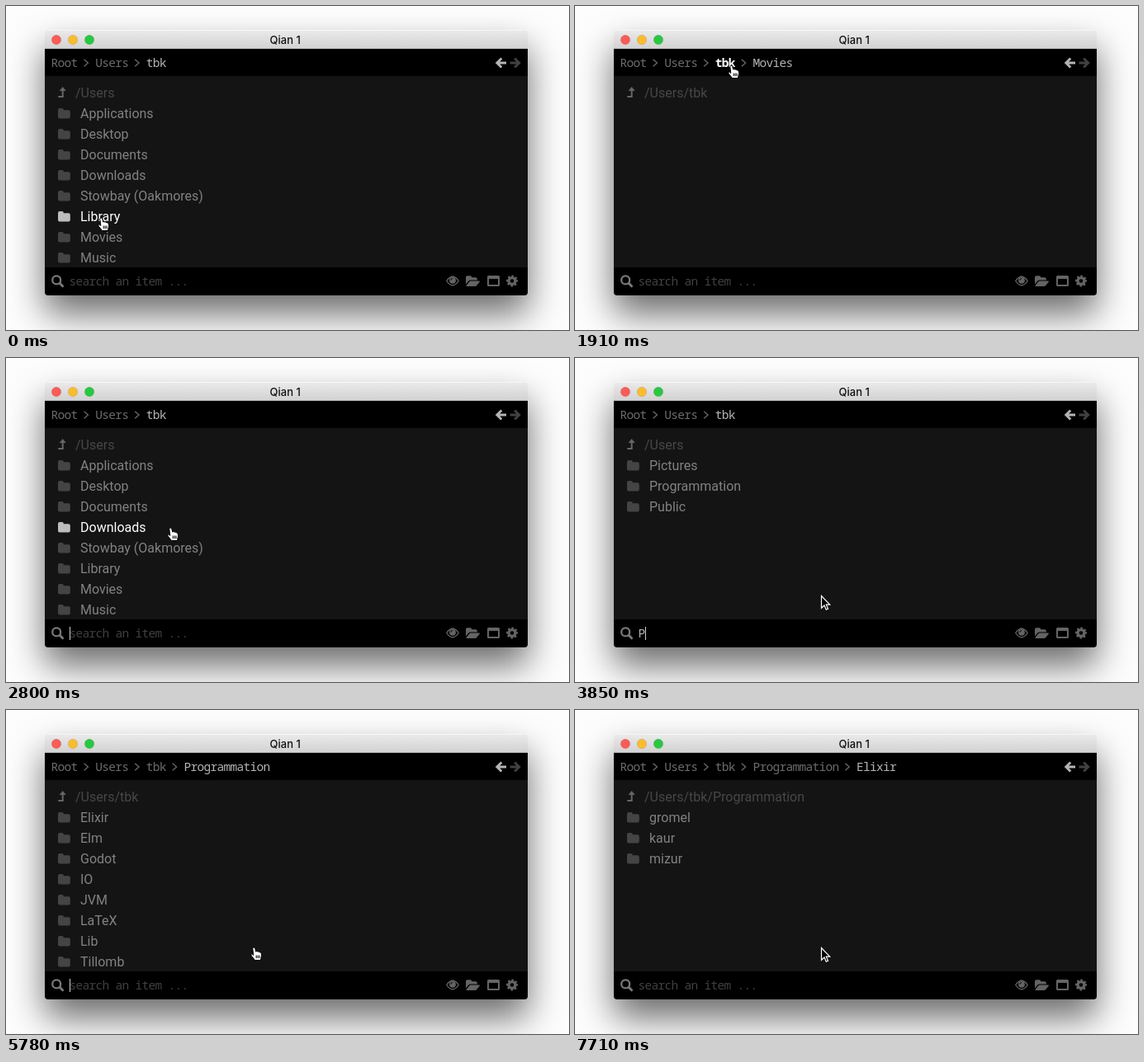
Recreate the animation shown at these times as an HTML page. Size 682 by 393 pixels, loop 8 s.

```html
<!DOCTYPE html>
<html lang="en">
<head>
<meta charset="utf-8">
<title>File browser</title>
<style>
  html, body { margin: 0; width: 100%; height: 100%; overflow: hidden; background: #fdfdfd; }
  svg { display: block; width: 682px; height: 393px; }
  text { white-space: pre; }
  .title { font: 500 13px Inter, sans-serif; fill: #111; text-anchor: middle; }
  .mono { font: 14.5px "Noto Sans Mono", monospace; letter-spacing: -.7px; }
  .item { font: 16px Roboto, sans-serif; }
  .line { fill: none; }
</style>
</head>
<body>
<svg viewBox="0 0 682 393">
  <defs>
    <linearGradient id="bar" x2="0" y2="1">
      <stop stop-color="#ebebeb"/>
      <stop offset="1" stop-color="#d1d1d1"/>
    </linearGradient>
    <path id="folder" d="M2 0h2.8a2 2 0 0 1 2 2v.3h6a2 2 0 0 1 2 2v6.2a2 2 0 0 1-2 2H2a2 2 0 0 1-2-2V2a2 2 0 0 1 2-2z"/>
    <g id="up">
      <path class="line" stroke="currentColor" stroke-width="2" d="M63.3 110h5.4v-8"/>
      <path fill="currentColor" d="M64.6 103l4.1-5 4.1 5z"/>
    </g>
    <path id="arrow" d="M.5 .5V15.300l3.500-3.300 2.300 5.200 2.200-.9-2.200-5.100h4.400z" fill="#000" stroke="#fff" stroke-width="1.200"/>
    <g id="hand" stroke="#000">
      <path fill="#fff" d="M.8 1.500Q1 0 2.400 .1 3.600 .2 3.900 1.700L4.700 5.100Q5.500 4 6.800 5.100 8 4.400 9 5.700 10.700 5.400 11.200 7.100 12 9.500 11.200 12L10.400 15.500H3.600L-.6 10.300Q-1.800 8.500-.6 8.100 .4 7.900 1.800 9.500z"/>
      <path class="line" d="M5.200 9.500v3.600M7.100 9.500v3.600M9 9.500v3.600"/>
    </g>
  </defs>

  <rect width="682" height="393" fill="#fdfdfd"/>
  <rect x="47" y="51" width="585" height="322" rx="5" fill-opacity=".58" style="filter: blur(21.5px)"/>
  <rect x="47" y="40" width="585" height="311" rx="4" fill="#000"/>
  <path d="M47 52V34a5 5 0 0 1 5-5h575a5 5 0 0 1 5 5v18z" fill="url(#bar)"/>
  <path d="M51 29.5h577" stroke="#f6f6f6"/>
  <path d="M47 51.5h585" stroke="#bababa"/>
  <rect x="47" y="85" width="585" height="232" fill="#141414"/>
  <g stroke="#000" stroke-opacity=".1">
    <circle cx="61" cy="41" r="5.700" fill="#fc5b57"/>
    <circle cx="81" cy="41" r="5.700" fill="#fdbc2e"/>
    <circle cx="101" cy="41" r="5.700" fill="#28c840"/>
  </g>
  <text class="title" x="338.2" y="46">Qian 1</text>

  <g class="line" stroke-width="2.800">
    <path stroke="#b4b4b4" d="M600.3 63.4L594.7 69l5.6 5.6M595 69h11"/>
    <path stroke="#414141" d="M616.2 63.4l5.6 5.6-5.6 5.6M621.5 69h-11"/>
  </g>

  <g class="line" stroke="#777">
    <circle cx="61.2" cy="332.4" r="5" stroke-width="2.3"/>
    <path d="M65.2 336.4l3.4 3.4" stroke-width="3" stroke-linecap="round"/>
  </g>
  <g fill="#646464" stroke="#646464" stroke-width="0">
    <path class="line" stroke-width="1.3" d="M533.7 333.5q7.300-10.500 14.600 0-7.300 10.500-14.600 0z"/>
    <circle cx="541" cy="332.8" r="3.9"/>
    <path class="line" stroke="#000" stroke-width="1" d="M538.9 332.7q.2-2 2.1-2.1"/>
    <path d="M557 337.5v-8.200a2 2 0 0 1 2-2h3.200a2 2 0 0 1 2 2h4.600a2 2 0 0 1 2 2v1.200h-8.100q-1.600 0-2.600 1.200z"/>
    <path d="M557.6 339l3.400-4.300q.9-1.100 2.200-1.100h10q1.300 0 .5 1.100l-3.300 4.100q-1 1.200-2.200 1.200h-10q-1.200 0-.6-1z"/>
    <path fill-rule="evenodd" d="M584.5 327h12a1.5 1.5 0 0 1 1.5 1.5v10a1.5 1.5 0 0 1-1.5 1.5h-12a1.5 1.5 0 0 1-1.5-1.5v-10a1.5 1.5 0 0 1 1.5-1.5zM585 331v7h11v-7z"/>
    <g class="line" transform="translate(613 333.5)">
      <circle r="3.9" stroke-width="3.2"/>
      <circle r="5.9" stroke-width="2.2" stroke-dasharray="2.4 2.234" transform="rotate(-12)"/>
    </g>
  </g>
  <g id="view"></g>
</svg>

<script>
const LOOP = 8000, ROW = 25, CHAR = 8, GAP = 21.6;
const view = document.getElementById('view');

const home = ['Root', 'Users', 'tbk'];
const code = [...home, 'Programmation'];
const places = {
  home: { crumbs: home, items: ['Applications', 'Desktop', 'Documents', 'Downloads',
    'Stowbay (Oakmores)', 'Library', 'Movies', 'Music', 'Pictures', 'Programmation', 'Public'] },
  movies: { crumbs: [...home, 'Movies'], items: [] },
  code: { crumbs: code, items: ['Elixir', 'Elm', 'Godot', 'IO', 'JVM', 'LaTeX', 'Lib', 'Tillomb'] },
  elixir: { crumbs: [...code, 'Elixir'], items: ['gromel', 'kaur', 'mizur'] }
};

// Each step keeps every value it does not change.
const steps = [
  { t: 0, place: 'home', x: 113, y: 257, query: '', caret: false, idle: false, stale: false },
  { t: 140, x: 118, y: 270 },
  { t: 290, x: 121, y: 278 },
  { t: 740, place: 'movies' },
  { t: 880, x: 135, y: 272 },
  { t: 1030, x: 200, y: 240 },
  { t: 1180, x: 290, y: 195 },
  { t: 1320, x: 342, y: 155 },
  { t: 1470, x: 320, y: 121 },
  { t: 1610, x: 262, y: 90 },
  { t: 1760, x: 205, y: 74 },
  { t: 1910, x: 187, y: 72 },
  { t: 2060, place: 'home' },
  { t: 2210, x: 188, y: 80 },
  { t: 2350, x: 190, y: 105 },
  { t: 2500, x: 193, y: 143 },
  { t: 2650, x: 196, y: 182 },
  { t: 2800, x: 197, y: 206, caret: true },
  { t: 3250, x: 250, y: 250, caret: false },
  { t: 3400, x: 298, y: 288 },
  { t: 3850, query: 'P', caret: true, idle: true },
  { t: 4000, query: 'Pr' },
  { t: 4140, query: 'Prog' },
  { t: 4290, query: 'Progr' },
  { t: 4730, place: 'code', query: '', stale: true },
  { t: 4880, stale: false },
  { t: 5330, caret: false },
  { t: 5780, caret: true },
  { t: 6370, query: 'E' },
  { t: 6520, query: 'El' },
  { t: 6660, query: 'Eli' },
  { t: 6810, query: 'Elix' },
  { t: 7110, place: 'elixir', query: '' },
  { t: 7710, caret: false }
];
steps.forEach((step, i) => { steps[i] = { ...steps[i - 1], ...step }; });

const label = (kind, x, y, fill, str, weight = 400) =>
  `<text class="${kind}" x="${x}" y="${y}" fill="${fill}" style="font-weight: ${weight}">${str}</text>`;

function draw({ place, x, y, query, caret, idle, stale }) {
  const { crumbs, items } = places[place];
  const rows = items.filter(name => name.startsWith(query)).slice(0, 8);
  const row = y >= 93 && y < 317 ? Math.floor((y - 93) / ROW) : -1;
  const lit = i => !idle && row === i;
  let hand = row >= 0 && row <= rows.length;
  let out = '';

  let left = 54.6;
  crumbs.forEach((name, i) => {
    const last = i === crumbs.length - 1, right = left + name.length * CHAR;
    const over = y > 52 && y < 85 && x >= left && x <= right;
    hand = hand || over;
    out += label('mono', left, 74, over ? '#fff' : last ? '#b4b4b4' : '#6c6c6c', name, over ? 700 : last ? 500 : 400);
    if (!last) out += `<path class="line" stroke="#666" stroke-width="1.4" d="M${right + 8} 64.8l4.8 4.2-4.8 4.2"/>`;
    left = right + GAP;
  });

  out += `<use href="#up" color="${lit(0) ? '#bbb' : '#666'}"/>`;
  out += label('item', 84, 111, lit(0) ? '#fff' : '#474747', '/' + crumbs.slice(1, -1).join('/'));
  rows.forEach((name, i) => {
    const top = 124 + i * ROW, on = lit(i + 1);
    out += `<use href="#folder" x="63" y="${top}" fill="${on ? '#bdbdbd' : '#444'}"/>`;
    out += label('item', 90, top + 12, on ? '#fff' : '#828282', name);
  });

  out += query ? label('mono', 76.6, 339, '#b4b4b4', query) : label('mono', 76.6, 339, '#404040', 'search an item ...');
  if (caret) out += `<path stroke="#ccc" d="M${77.5 + query.length * CHAR} 326v16"/>`;
  out += `<use href="#${hand && !stale ? 'hand' : 'arrow'}" x="${x}" y="${y}"/>`;
  view.innerHTML = out;
}

let shown, start;
function tick(now) {
  start ??= now;
  const t = (now - start) % LOOP;
  const step = steps.findLast(s => s.t <= t);
  if (step !== shown) draw(shown = step);
  requestAnimationFrame(tick);
}
draw(shown = steps[0]);
requestAnimationFrame(tick);
</script>
</body>
</html>
```
